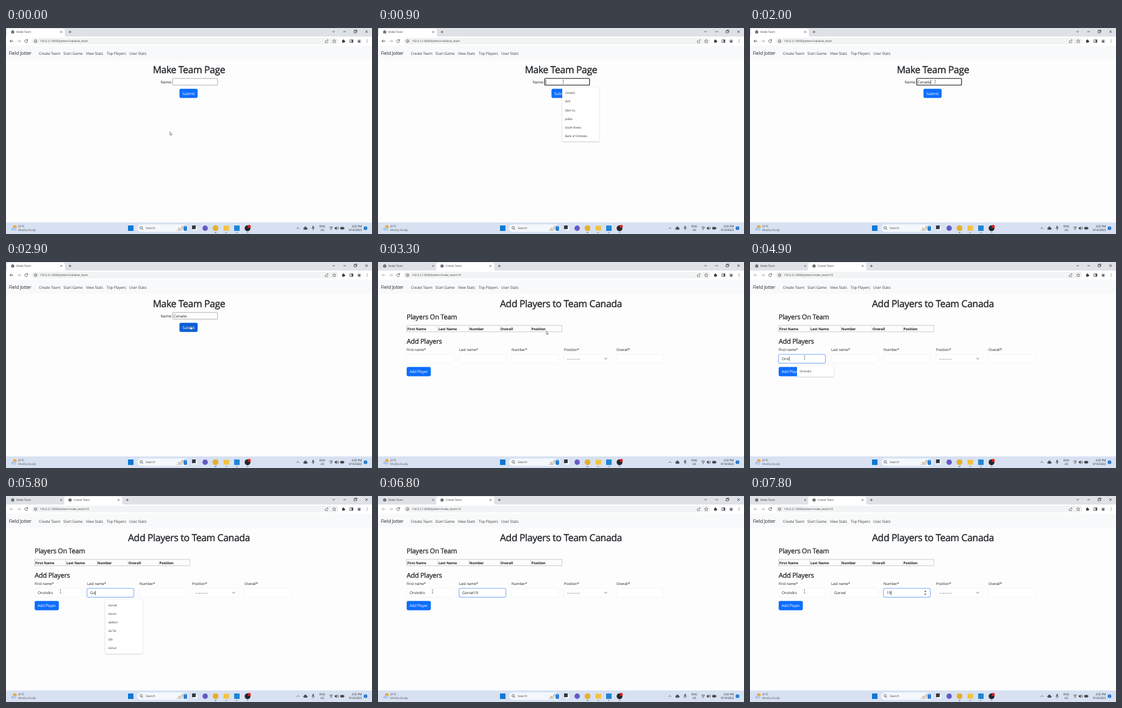
An HTML page that plays this animation: 600 by 338 pixels, repeating every 8000 ms.

```html
<!DOCTYPE html>
<html lang="en">
<head>
<meta charset="utf-8">
<title>Team form</title>
<style>
html, body { margin: 0; width: 100%; height: 100%; overflow: hidden; background: #fdfdfd; }
svg { display: block; }
text { font-family: 'Open Sans', 'Noto Sans', sans-serif; letter-spacing: -.02em; fill: #212529; white-space: pre; text-rendering: geometricPrecision; }
.bold { stroke: #212529; stroke-width: .025em; }
.dashes { letter-spacing: .07em; }
.line { fill: none; stroke: #444; stroke-width: .8; }
</style>
</head>
<body>
<svg width="600" height="338" viewBox="0 0 600 338">
  <defs>
    <filter id="shadow" x="-10%" y="-10%" width="120%" height="125%">
      <feDropShadow dx="0" dy=".6" stdDeviation=".8" flood-opacity=".25"/>
    </filter>
  </defs>
  <g id="frame"></g>
  <g id="page"></g>
  <g id="pointer"></g>
</svg>
<script>
const LOOP = 8000, STEP = 100;
const $ = id => document.getElementById(id);

// Drawing helpers
const text = (x, y, s, size = 6.25, extra = '') =>
  `<text x="${x}" y="${y}" font-size="${size}" ${extra}>${s}</text>`;
const rect = (x, y, w, h, fill, r = 0, extra = '') =>
  `<rect x="${x}" y="${y}" width="${w}" height="${h}" rx="${r}" fill="${fill}" ${extra}/>`;
const disc = (x, y, r, fill) => `<circle cx="${x}" cy="${y}" r="${r}" fill="${fill}"/>`;
const line = (d, extra = '') => `<path class="line" d="${d}" ${extra}/>`;
const cross = (x, y, r) => line(`M${x - r} ${y - r}l${2 * r} ${2 * r}m0 ${-2 * r}l${-2 * r} ${2 * r}`);
const title = s => text(300, 74, s, 15.7, 'text-anchor="middle" class="bold"');
const heading = (y, s) => text(47, y, s, 11, 'class="bold"');
const button = (x, y, w, label, hover) =>
  rect(x, y, w, 15.1, hover ? '#0b5ed7' : '#0d6efd', 2.3) +
  text(x + w / 2, y + 10, label, 6.25, 'text-anchor="middle" style="fill:#fff"');

// Browser toolbar and taskbar
function drawFrame() {
  const small = 4.7, grey = 'style="fill:#555"';
  const right = 'text-anchor="end"', mid = 'text-anchor="middle"';
  return rect(0, 0, 600, 14, '#dee1e6') +
    line('M535 5l2 2 2-2M553 6h4.5M570.5 4.5h3.5v3.5h-3.5zM571.7 4.5v-1.2h3.5v3.5h-1.2') + cross(591, 6, 2) +
    rect(0, 14, 600, 15.5, '#fff') +
    line('M18.5 21.5h5.5m-2.3-2.3l2.3 2.3-2.3 2.3', 'style="stroke:#aaa"') +
    line('M35.2 20.2a2.4 2.4 0 1 0 .2 2M35.6 18.5v2h-2') +
    rect(42, 16, 503, 11, '#f1f3f4', 5.5) +
    line('M46.3 21.5a2.2 2.2 0 1 0 4.4 0a2.2 2.2 0 1 0-4.4 0M48.5 21.2v1.3') +
    line('M523.5 20.5v3.5h4v-1.5M525 22q.3-2.3 3-2.3m-1.2-1.3l1.3 1.3-1.3 1.3', 'style="stroke-width:.6"') +
    line('M538 18.6l.9 1.9 2 .2-1.5 1.4.4 2.1-1.8-1.1-1.8 1.1.4-2.1-1.5-1.4 2-.2z', 'style="stroke-width:.6"') +
    rect(551, 20, 4, 4, '#444', .5) + disc(553, 19.8, 1, '#444') + disc(555.2, 22, 1, '#444') +
    line('M563.8 19.3h5v4.4h-5z') + rect(566.5, 19.3, 2.3, 4.4, '#444') +
    disc(579, 21.5, 3.6, '#d3d8e0') + disc(579, 22, 1.9, '#59616d') +
    [19.5, 21.5, 23.5].map(y => disc(592, y, .6, '#444')).join('') +
    rect(0, 29.3, 600, 22.2, '#f8f9fa') +
    text(4.7, 44.1, 'Field Jotter', 7.8) +
    [[54, 'Create Team'], [94, 'Start Game'], [131, 'View Stats'], [165, 'Top Players'], [202, 'User Stats']]
      .map(([x, s]) => text(x, 43.7, s, 6.25, 'style="fill:#444"')).join('') +

    rect(0, 319, 600, 19, '#d7e1f2') +
    disc(14.5, 326.5, 2.9, '#f3a62b') +
    disc(11, 330, 2.3, '#9fbbe0') + disc(14, 329.6, 2.6, '#b5cbe9') + rect(10, 329.7, 7, 2.6, '#b5cbe9', 1.3) +
    text(20, 327, '21°C', small) + text(20, 333.2, 'Mostly cloudy', small, grey) +
    rect(200, 324, 9, 9, '#0b78d4', .5) +
    rect(215, 322.3, 84, 12.2, '#f4f7fc', 6.1) +
    line('M219.6 327.7a2 2 0 1 0 4 0a2 2 0 1 0-4 0M223 329.3l1.7 1.7') +
    text(229, 330.4, 'Search', 5.2, grey) +
    line('M280 332h8l2-6M282 328l3 3 5-7', 'style="stroke:#9a9482"') +
    disc(284, 329.5, 1.8, '#d8c79a') + rect(291, 324.5, 6, 8.5, '#2b7fd6', 2.5) + disc(294, 325, 1.6, '#7db8ec') +
    rect(307.5, 326, 6, 6, '#fff', .5) + rect(305, 324, 6, 6, '#33383f', .5) +
    disc(326.5, 328.5, 4.4, '#635bc4') + disc(343.5, 328.5, 4.8, '#e5b02c') +
    rect(356.7, 324.5, 9, 8, '#f3c33f', .8) + rect(374, 324, 9, 9, '#1f86d3', .8) +
    disc(396, 328.6, 4.8, '#25272b') + disc(398.8, 325.6, 2.5, '#e02020') +
    [343.5, 361, 378.5, 396].map(x => rect(x - 1.6, 335.3, 3.2, .9, x < 350 ? '#1a70c8' : '#858d99', .4)).join('') +
    line('M476.3 329.5l2.2-2.2 2.2 2.2') +
    rect(487.5, 327.6, 6.8, 3.4, '#4b535d', 1.7) + disc(490.8, 327.7, 2, '#4b535d') +
    rect(502.3, 324.8, 2.4, 4.2, '#555', 1.2) + line('M501.2 328q.2 2.2 2.3 2.2t2.3-2.2M503.5 330.2v1.6', 'style="stroke-width:.6"') +
    text(518.5, 327, 'ENG', small, mid) + text(518.5, 333.2, 'US', small, mid) +
    line('M530 327.3q3-2.7 6 0M531.2 328.9q1.8-1.6 3.6 0') + disc(533, 330.5, .8, '#444') +
    '<path d="M539 327.3h1.3l1.9-1.7v5.8l-1.9-1.7h-1.3z" fill="#444"/>' + line('M543.3 327q1 1.5 0 3m1-4q1.8 2.5 0 5', 'style="stroke-width:.6"') +
    rect(548, 326.6, 6, 3.8, '#444', .8) + rect(554.2, 327.8, .8, 1.5, '#444') +
    text(583.3, 327, '2:02 PM', small, right) + text(583.3, 333.2, '9/10/2023', small, right) +
    disc(589.3, 328.4, 3, '#1672c9') + text(589.3, 330, '1', 4.2, mid + ' style="fill:#fff"');
}

// Text typed one key at a time, with optional deletions
const typed = (s, keys, cuts = []) => t =>
  s.slice(0, keys.filter(k => k <= t).length - cuts.filter(k => k <= t).length);
const team = typed('Canada', [1200, 1300, 1400, 1600, 1700, 1800]);
const first = typed('Orvindro', [4500, 4600, 4700, 4900, 5000, 5100, 5200, 5300]);
const last = typed('Gorvet19', [5600, 5800, 5900, 6000, 6100, 6200, 6400, 6500], [7100, 7200]);
const number = typed('19', [7500, 7700]);

const TEAMS = ['Canada', 'QVX', 'Olen Vu', 'Jubbo', 'South Korea', 'Bank of Ombrela'];
const FIRSTS = ['Orvindro', 'Osket', 'Odrell', 'Obwen', 'Ontavo', 'Ozmen'];
const LASTS = ['Gorvet', 'Gorun', 'Gellom', 'Ge Tal', 'Gib', 'Gistun'];

// Suggestions follow the typed prefix one step late
function suggestions(x, y, names, prefix) {
  const hits = names.filter(n => n.startsWith(prefix) && n !== prefix);
  if (!hits.length) return '';
  return rect(x, y, 60.5, 4 + 14.1 * hits.length, '#fff', .8, 'filter="url(#shadow)"') +
    hits.map((n, i) => text(x + 4.4, y + 11 + 14.1 * i, n, 4.8, 'style="fill:#333"')).join('');
}

const value = (x, y, s, focus, caret = true) =>
  text(x, y, s, 6.25, focus ? 'id="typed"' : s[0] === '-' ? 'class="dashes"' : '') +
  (focus && caret ? rect(x, y - 6, .6, 7.4, '#222', 0, 'id="caret"') : '');

function tab(x, label, active) {
  const bg = active ? `<path d="M${x - 2} 14q2 0 2-2v-8q0-3 3-3h89q3 0 3 3v8q0 2 2 2z" fill="#fff"/>` : '';
  return bg + disc(x + 9.5, 6.5, 2.6, '#53575c') + line(`M${x + 8} 5.7l1.7 1 1.5-1.2M${x + 8.6} 8l1.5-.6`, 'style="stroke:#ddd;stroke-width:.6"') +
    text(x + 15.5, 8.3, label, 4.7, 'style="fill:#444"') + cross(x + 89, 6.5, 1.4);
}
const plus = x => line(`M${x - 2.2} 6.5h4.4m-2.2-2.2v4.4`);
const back = colour => line('M12 21.5h-5.5m2.3-2.3l-2.3 2.3 2.3 2.3', `style="stroke:${colour}"`);
const address = s => text(55.5, 23.4, '192.0.2.1:8000/jotters/' + s, 4.8, 'style="fill:#444"');

function makeTeam(t, hover) {
  const focus = t >= 800 && t < 2800;
  return tab(1.5, 'Make Team', true) + plus(105) + back('#444') + address('initialize_team') +
    title('Make Team Page') + text(253.5, 91, 'Name:') +
    rect(273.4, 82.8, 73.4, 11, '#fff', 1, focus ? 'stroke="#111" stroke-width="1.1"' : 'stroke="#777" stroke-width=".6"') +
    value(274.8, 91, team(t), focus) +
    button(284.4, 99.7, 29.7, 'Submit', hover) +
    (t >= 900 && focus ? suggestions(302, 97.3, TEAMS, team(t - STEP)) : '');
}

function addPlayers(t) {
  const active = t < 4300 ? -1 : t < 5500 ? 0 : t < 7400 ? 1 : 2;
  const values = [first(t), last(t), number(t), '---------', ''];
  const caret = t < 6800 || t >= 7100;
  const fields = ['First name*', 'Last name*', 'Number*', 'Position*', 'Overall*'].map((label, i) => {
    const x = 47 + 86 * i, on = i === active;
    return text(x, 146, label, 6) +
      (on ? rect(x - 1, 150.7, 78.4, 16.2, '#b9d3fb', 3) : '') +
      rect(x, 151.7, 76.4, 14.2, '#fff', 2.2, `stroke="${on ? '#86b0f8' : '#f0f2f4'}" stroke-width=".8"`) +
      value(x + 5, 161.4, values[i], on, caret);
  }).join('');
  const columns = ['First Name', 'Last Name', 'Number', 'Overall', 'Position'].map((s, i) =>
    rect(47 + 50.9 * i, 104, 50.9, 10.6, 'none', 0, 'stroke="#dcdfe2" stroke-width=".6"') +
    text(48 + 50.9 * i, 111.5, s, 5.9, 'font-weight="700"')).join('');
  return tab(1.5, 'Make Team', false) + tab(95.5, 'Create Team', true) + plus(199) + back('#aaa') + address('make_team/18') +
    title('Add Players to Team Canada') + heading(93.9, 'Players On Team') +
    columns + rect(47, 104, 254.5, 10.6, 'none', 0, 'stroke="#bfc3c7" stroke-width=".7"') +
    heading(134, 'Add Players') + fields + line('M371 157.5l2.2 2.2 2.2-2.2') +
    (active === 2 ? '<path d="M285.6 157.2l1.8-2.2 1.8 2.2zM285.6 160.3l1.8 2.2 1.8-2.2z" fill="#555"/>' : '') +
    button(47, 172.3, 39.6, 'Add Player', false) +
    (active === 0 && t >= 4500 ? suggestions(77, 169.8, FIRSTS, first(t - STEP)) : '') +
    (active === 1 && t >= 5700 ? suggestions(163, 169.8, LASTS, last(t - STEP)) : '');
}

// Pointer moves: start time, end time, destination
const MOVES = [[0, 600, 303.6, 88.3], [2000, 2700, 302.8, 107.2], [3100, 4000, 89.3, 156.6]];
function pointerAt(t) {
  let x = 268.6, y = 170.3;
  for (const [a, b, tx, ty] of MOVES) {
    const p = Math.min(1, Math.max(0, (t - a) / (b - a))), e = p * p * (3 - 2 * p);
    x += (tx - x) * e;
    y += (ty - y) * e;
  }
  return [x, y];
}
const inside = (x, y, l, t, w, h) => x > l && x < l + w && y > t && y < t + h;
const ARROW = '<path d="M0 0v5.2l1.2-1 .9 1.8.8-.4-.8-1.8h1.6z" fill="#fff" stroke="#333" stroke-width=".5"/>';
const BEAM = line('M-1.2-2.7h2.4M0-2.7v5.4M-1.2 2.7h2.4', 'style="stroke:#444;stroke-width:.5"');
const HAND = '<path d="M-.6-1.8q.6-.7 1.2 0v1.8l2 .5q.6.3.4 1.2l-.5 1.9h-3l-1.6-2.2q.3-.8 1.5 0z" fill="#fff" stroke="#222" stroke-width=".4"/>';

let shown = -1;
function draw(now) {
  const t = Math.floor(now % LOOP / STEP) * STEP;
  requestAnimationFrame(draw);
  if (t === shown) return;
  shown = t;
  const [x, y] = pointerAt(t), onForm = t < 3100;
  const hover = onForm && inside(x, y, 284, 100, 30, 14.6);
  const editing = onForm ? inside(x, y, 273, 82, 74, 12) : inside(x, y, 47, 151, 77, 15);
  $('page').innerHTML = onForm ? makeTeam(t, hover) : addPlayers(t);
  $('pointer').innerHTML = `<g transform="translate(${x} ${y})">${hover ? HAND : editing ? BEAM : ARROW}</g>`;
  const caret = $('caret');
  if (caret) caret.setAttribute('x', +caret.getAttribute('x') + $('typed').getComputedTextLength() + .3);
}
$('frame').innerHTML = drawFrame();
requestAnimationFrame(draw);
</script>
</body>
</html>
```
